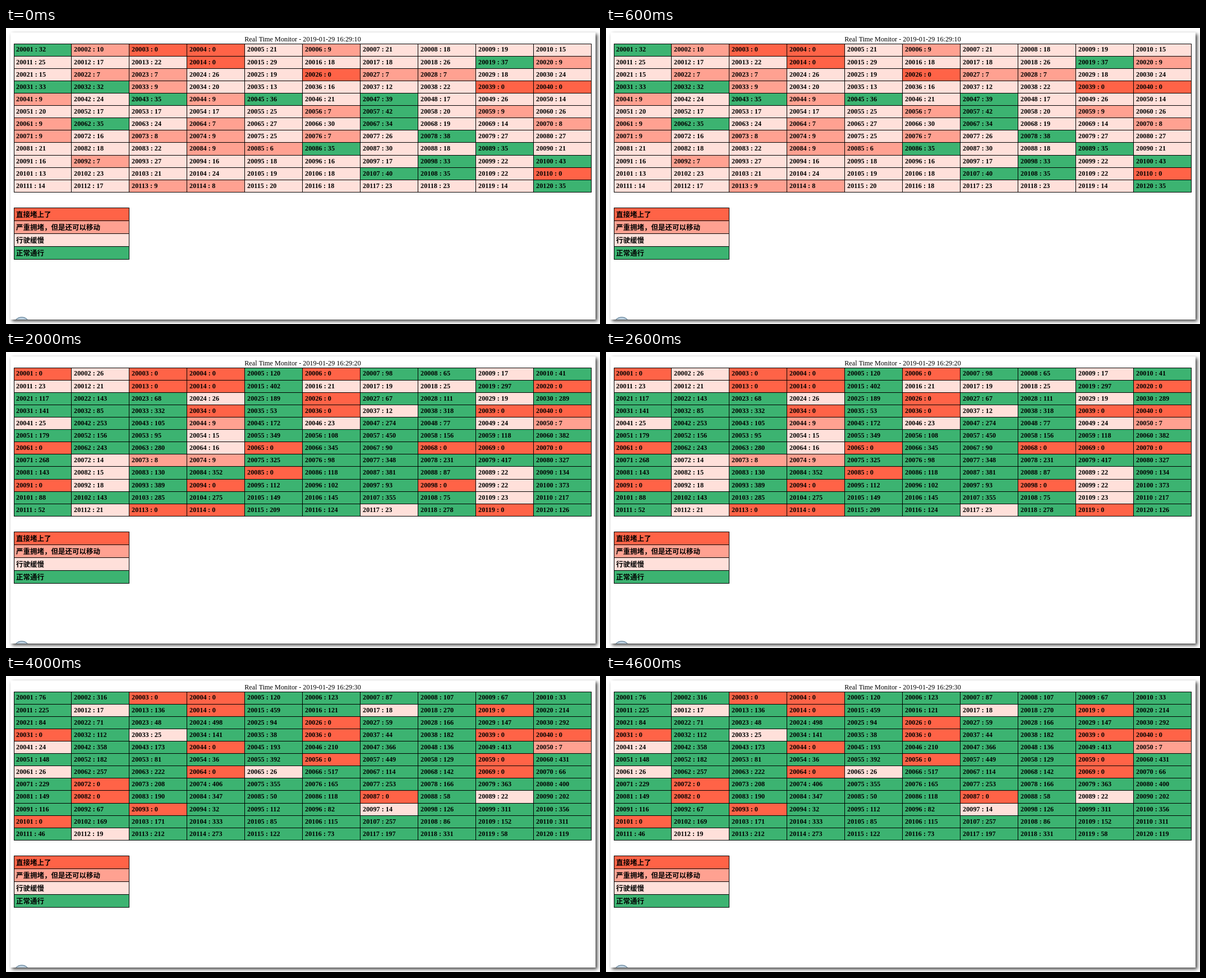
An HTML page with a canvas that plays this animation: 1059x529 px, repeating every 5 s.

```html
<!DOCTYPE html>
<html lang="zh-CN">
<head>
<meta charset="utf-8">
<title>Real Time Monitor</title>
<style>
html, body { margin: 0; width: 100%; height: 100%; overflow: hidden; background: #fff; }
canvas { display: block; }
</style>
</head>
<body>
<canvas id="stage" width="1059" height="529"></canvas>
<script>
const ctx = document.getElementById('stage').getContext('2d');
const STEP = 1000;
const COLS = 10, SECTIONS = 120;
const LEFT = 13.5, TOP = 27.5, COL_W = 102.95, ROW_H = 22.12;
const SERIF = '"Liberation Serif", serif';
const CJK = '"Noto Sans CJK SC", "Noto Sans CJK", sans-serif';
const LEVELS = {
  blocked: { color: '#ff6347', label: '直接堵上了' },
  jammed: { color: '#ffa191', label: '严重拥堵，但是还可以移动' },
  slow: { color: '#ffe0da', label: '行驶缓慢' },
  free: { color: '#3cb371', label: '正常通行' }
};

// Sections that stand out from the usual level; `usual: null` keeps the previous levels.
const SNAPSHOTS = [
  {
    usual: 'slow', top: 50,
    blocked: '3 4 14 26 39 40 110',
    jammed: '2 6 20 22 23 27 28 33 41 44 56 59 61 64 70 71 73 74 76 84 85 92 113 114',
    free: '1 19 31 32 43 45 47 57 62 67 78 86 89 98 100 107 108 120'
  },
  {
    usual: null, top: 50,
    blocked: '22',
    jammed: '12 18 50 90 110',
    slow: '1 20 23 41 57 64 78 84 92',
    free: '5 81 106'
  },
  {
    usual: 'free', top: 550,
    blocked: '1 3 4 6 13 14 20 26 34 36 39 40 61 65 68 69 70 85 91 94 98 113 114 119',
    jammed: '44 50 73 74',
    slow: '2 9 11 12 16 17 18 24 29 37 41 46 49 54 64 72 82 89 92 99 109 112 117'
  },
  {
    usual: 'free', top: 550,
    blocked: '3 4 14 15 22 26 39 40 64 68 77 91 92 100 119',
    jammed: '50',
    slow: '9 12 17 33 41 46 72 82 89 112 114 117'
  },
  {
    usual: 'free', top: 550,
    blocked: '3 4 14 19 26 31 36 39 40 44 56 59 64 69 72 82 87 93 101',
    jammed: '50',
    slow: '12 17 33 41 61 65 89 97 112'
  }
];

function hash(a, b) {
  const v = Math.sin(a * 127.1 + b * 311.7) * 43758.5453;
  return v - Math.floor(v);
}

// Each section has its own typical speed and drifts around it.
function speedOf(level, section, index) {
  const r = 0.75 * hash(section, 0) + 0.25 * hash(section, index + 1);
  switch (level) {
    case 'blocked': return 0;
    case 'jammed': return 6 + Math.floor(r * 5);
    case 'slow': return 11 + Math.floor(r * 20);
    default: return 31 + Math.floor(r * r * (SNAPSHOTS[index].top - 31));
  }
}

let levels = [];
const readings = SNAPSHOTS.map((snap, index) => {
  levels = Array.from({ length: SECTIONS }, (_, i) => snap.usual || levels[i]);
  for (const name of Object.keys(LEVELS)) {
    for (const id of (snap[name] || '').match(/\d+/g) || []) levels[id - 1] = name;
  }
  return levels.map((level, i) => ({ level, speed: speedOf(level, i + 1, index) }));
});

const colX = c => Math.round(LEFT + c * COL_W);
const rowY = r => Math.round(TOP + r * ROW_H);

// Filled box with a one-pixel black border shared with its neighbours.
function box(x0, y0, x1, y1, color) {
  ctx.fillStyle = '#000';
  ctx.fillRect(x0, y0, x1 - x0 + 1, y1 - y0 + 1);
  ctx.fillStyle = color;
  ctx.fillRect(x0 + 1, y0 + 1, x1 - x0 - 1, y1 - y0 - 1);
}

function write(text, x, y, font, align = 'left') {
  ctx.font = font;
  ctx.textAlign = align;
  ctx.fillStyle = '#000';
  ctx.fillText(text, x, y);
}

function drawPage() {
  ctx.fillStyle = '#fff';
  ctx.fillRect(0, 0, 1059, 529);
  ctx.save();
  ctx.shadowColor = 'rgba(0, 0, 0, 0.75)';
  ctx.shadowBlur = 6;
  ctx.shadowOffsetX = ctx.shadowOffsetY = 2.5;
  ctx.fillRect(8, 8, 1043, 513);
  ctx.restore();

  // Round button cut off by the page's lower edge
  ctx.save();
  ctx.beginPath();
  ctx.rect(8, 8, 1043, 513);
  ctx.clip();
  ctx.beginPath();
  ctx.arc(28, 531, 14.2, 0, Math.PI * 2);
  ctx.fillStyle = '#bfd3e2';
  ctx.fill();
  ctx.strokeStyle = '#67859c';
  ctx.lineWidth = 1.2;
  ctx.stroke();
  ctx.restore();
}

function drawGrid(cells) {
  cells.forEach(({ level, speed }, i) => {
    const c = i % COLS, r = Math.floor(i / COLS);
    box(colX(c), rowY(r), colX(c + 1), rowY(r + 1), LEVELS[level].color);
    const base = Math.round(TOP + r * ROW_H + 14.95);
    write(`${20001 + i} : ${speed}`, 18 + c * 103, base, `bold 12.25px ${SERIF}`);
  });
}

function drawLegend() {
  Object.values(LEVELS).forEach(({ color, label }, i) => {
    const y = 321 + i * 23;
    box(colX(0), y, colX(2), y + 23, color);
    write(label, 18, y + 17, `bold 12.5px ${CJK}`);
  });
}

function draw(index) {
  drawPage();
  write(`Real Time Monitor - 2019-01-29 16:29:${10 + index * 5}`, 529, 24, `12.22px ${SERIF}`, 'center');
  drawGrid(readings[index]);
  drawLegend();
}

const start = performance.now();
let shown = -1;
function tick() {
  const index = Math.floor((performance.now() - start) / STEP) % readings.length;
  if (index !== shown) draw(shown = index);
  requestAnimationFrame(tick);
}
tick();
</script>
</body>
</html>
```
